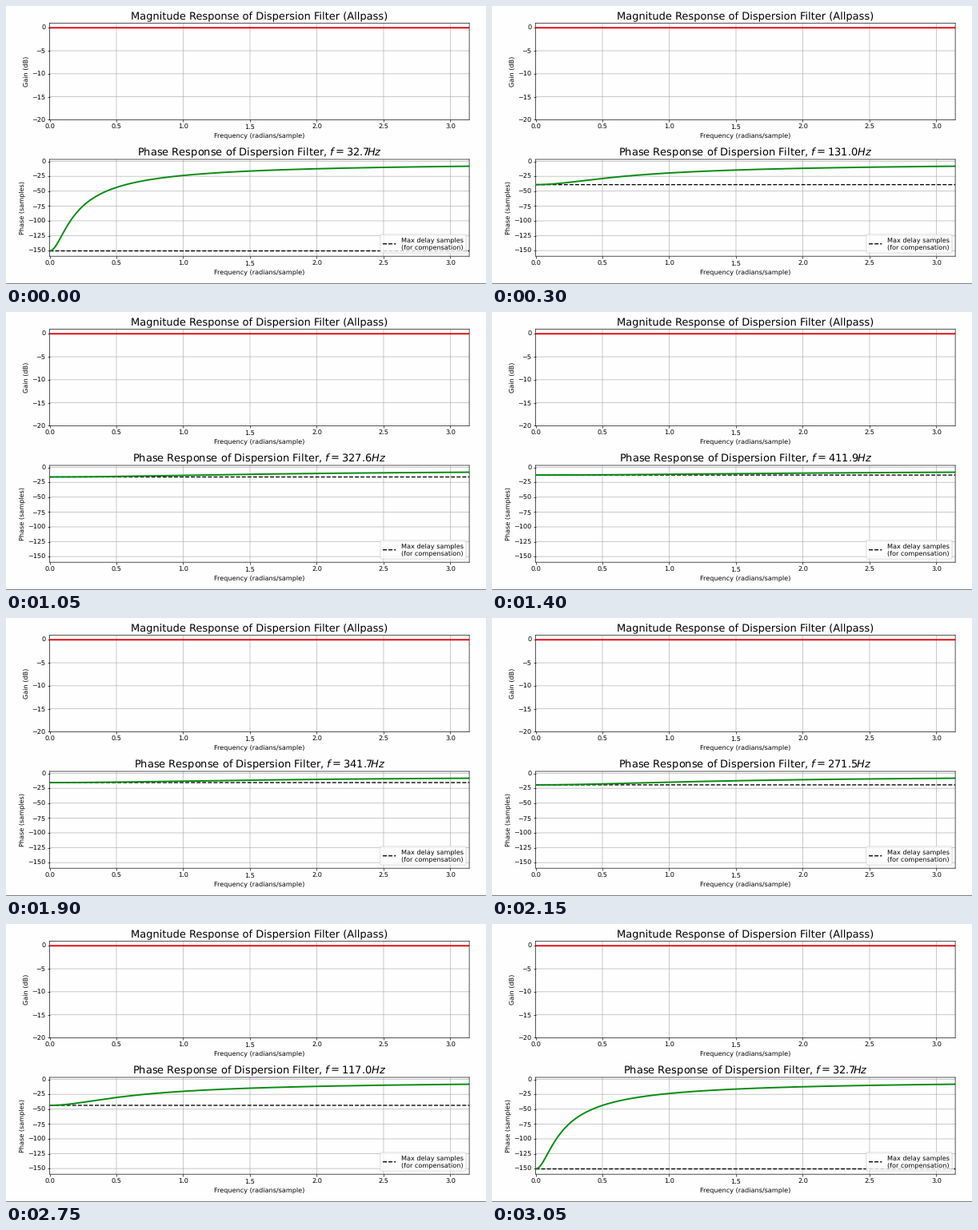
A matplotlib script that plays this animation: 600 by 348 pixels, repeating every 3100 ms.

```python
import numpy as np
import matplotlib.pyplot as plt
from matplotlib.animation import FuncAnimation
from matplotlib.patches import Rectangle

W, H, DPI = 600, 348, 60
FRAMES, INTERVAL = 62, 50
STAGES = 8            # first-order allpass sections in cascade
BG = "#fefefe"
RED, GREEN = "#e60008", "#048a10"

plt.rcParams.update({
    "font.family": "DejaVu Sans",
    "font.size": 9.75,
    "text.hinting": "none",
    "path.snap": False,
    "axes.titlesize": 15.6,
    "axes.titlepad": 5.5,
    "axes.labelpad": 3.4,
    "xtick.major.pad": 2.8,
    "ytick.major.pad": 2.8,
    "axes.facecolor": BG,
    "figure.facecolor": BG,
})

w = np.linspace(1e-4, np.pi, 800)
sweep = np.linspace(32.703, 440, 30)
sweep = np.concatenate([sweep, sweep[::-1]])

# Playback pace: the sweep runs slightly unevenly over the loop
PACE = ([0, 6, 15, 28, 38, 48, 61], [0, 7, 15, 27, 37, 46, 59])


def section_delay(f0):
    """DC delay of one section for a string tuned to f0."""
    key = 12 * np.log2(f0 / 27.5) + 1
    return np.exp(3.16 - 0.0562 * key)


def phase_delay(d):
    a = (1 - d) / (1 + d)
    arg = np.angle(1 + a * np.exp(-1j * w))
    return -STAGES * (w + 2 * arg) / w


def add_axes(top, bottom, ylim, yticks, ylabel):
    left, right = 54.5, 579.1
    ax = fig.add_axes([left / W, 1 - bottom / H, (right - left) / W, (bottom - top) / H])
    ax.set(xlim=(0, np.pi), ylim=ylim, yticks=yticks,
           xlabel="Frequency (radians/sample)", ylabel=ylabel)
    ax.grid(True)
    return ax


fig = plt.figure(figsize=(W / DPI, H / DPI), dpi=DPI)

gain_ax = add_axes(21.5, 142.4, (-20, 1), range(-20, 1, 5), "Gain (dB)")
gain_ax.set_title("Magnitude Response of Dispersion Filter (Allpass)")
gain_ax.plot(w, np.zeros_like(w), RED, lw=2.2)

phase_ax = add_axes(192, 313.2, (-159.5, 3.5), range(-150, 1, 25), "Phase (samples)")
title = phase_ax.set_title("")
limit = phase_ax.axhline(0, color="k", ls="--", lw=1.6,
                         label="Max delay samples\n(for compensation)")
curve, = phase_ax.plot(w, np.zeros_like(w), GREEN, lw=2.3)
phase_ax.legend(handles=[limit], loc="lower right")

# Thin rule along the bottom edge
fig.add_artist(Rectangle((0, 0), 1, 1 / H, color="#808080", lw=0))


def update(i):
    f0 = sweep[int(round(np.interp(i, *PACE)))]
    d = section_delay(f0)
    curve.set_ydata(phase_delay(d))
    limit.set_ydata([-STAGES * d] * 2)
    title.set_text(f"Phase Response of Dispersion Filter, $f = {f0:.1f}Hz$")
    return curve, limit, title


anim = FuncAnimation(fig, update, frames=FRAMES, interval=INTERVAL,
                     repeat=True, repeat_delay=0, blit=False)
plt.show()
```
